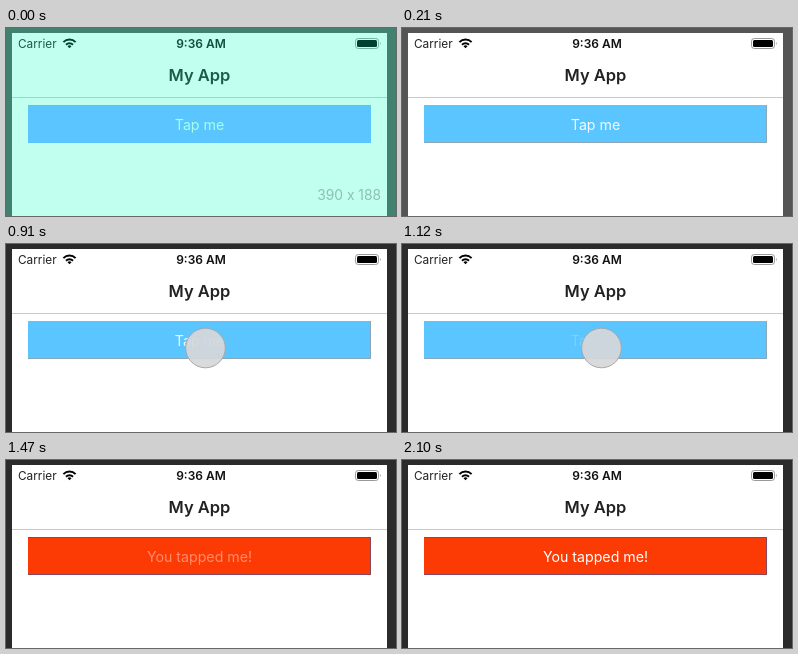
Animation, 390 px wide and 188 px high, one loop 2.52 s. Source, as an HTML page:

```html
<!DOCTYPE html>
<html lang="en">
<head>
<meta charset="utf-8">
<title>Tap me</title>
<style>
  html, body { margin: 0; width: 100%; height: 100%; overflow: hidden; }
  svg { display: block; width: 390px; height: 188px; font-family: Inter, Roboto, sans-serif; }
  .mid { text-anchor: middle; }
  .label { font-size: 14.2px; }
</style>
</head>
<body>
<svg viewBox="0 0 390 188">
  <rect id="bezel" width="390" height="188"/>
  <path d="M6 5H381V188H6Z" fill="#fff"/>
  <path d="M6 69.5H381" stroke="#cacaca"/>

  <!-- status bar -->
  <text x="12" y="19.8" font-size="11.8" fill="#222">Carrier</text>
  <path d="M60 16.7a4.9 4.9 0 0 1 7 0M57.4 14.1a8.6 8.6 0 0 1 12.2 0" fill="none" stroke="#000" stroke-width="2"/>
  <path d="M63.5 20.2l-2-2a2.8 2.8 0 0 1 4 0z"/>
  <text class="mid" x="195" y="19.8" font-size="12" font-weight="600" fill="#111">9:36 AM</text>
  <rect x="349.5" y="10.5" width="23" height="10" rx="2.8" fill="none" stroke="#999"/>
  <rect x="351" y="12" width="20" height="7" rx="1.5"/>
  <path d="M374 13.7q1.6 1.8 0 3.6z" fill="#999"/>

  <text class="mid" x="193.5" y="53" font-size="16.5" font-weight="600" fill="#222">My App</text>

  <!-- flash with the stage size at the start of the loop -->
  <g id="flash">
    <rect width="390" height="188" fill="rgb(8,255,190)" opacity=".25"/>
    <text x="375" y="172.3" font-size="13.8" text-anchor="end" fill="#8fbfb0">390 x 188</text>
  </g>

  <rect id="button" x="22" y="77" width="343" height="38"/>
  <path id="edge" fill="none"/>
  <text id="before" class="mid label" x="193.5" y="101.5">Tap me</text>
  <text id="after" class="mid label" x="193.5" y="101.5" fill="#fff">You tapped me!</text>
  <circle id="touch" cx="199.5" cy="104" r="19.8" fill="#d6d8da" fill-opacity=".93" stroke="#a6a8aa"/>
</svg>
<script>
  const LOOP = 2520, STEP = 70;
  const PRESS = 910, RELEASE = 1190, REVEAL = 1470, DONE = 1960;
  const $ = id => document.getElementById(id);
  const set = (id, attrs) => {
    for (const name in attrs) $(id).setAttribute(name, attrs[name]);
  };
  const mix = (t, t0, t1, a, b) => a + (b - a) * Math.min(1, Math.max(0, (t - t0) / (t1 - t0)));

  function draw(now) {
    const t = Math.floor(now % LOOP / STEP) * STEP;
    const flash = t < STEP, tapped = t >= RELEASE;
    set('bezel', { fill: t < PRESS ? '#555' : '#2b2b2b' });
    set('flash', { opacity: flash ? 1 : 0 });
    set('button', { fill: tapped ? '#fc3a03' : '#5ac5ff' });
    set('edge', {
      d: tapped ? 'M22 77.5H364.5V114.5H22' : 'M364.5 77V114.5H22',
      stroke: tapped ? '#85485a' : '#8ba6b8',
      opacity: flash ? 0 : 1
    });
    set('before', {
      fill: flash ? '#a6ffe6' : '#f4fbff',
      opacity: t > RELEASE ? 0 : mix(t, PRESS, 1120, 1, .22)
    });
    set('after', { opacity: t < REVEAL ? 0 : mix(t, REVEAL, DONE, .42, 1) });
    set('touch', { opacity: t >= PRESS && !tapped ? 1 : 0 });
  }

  const start = performance.now();
  function tick() {
    draw(performance.now() - start);
    requestAnimationFrame(tick);
  }
  tick();
</script>
</body>
</html>
```
